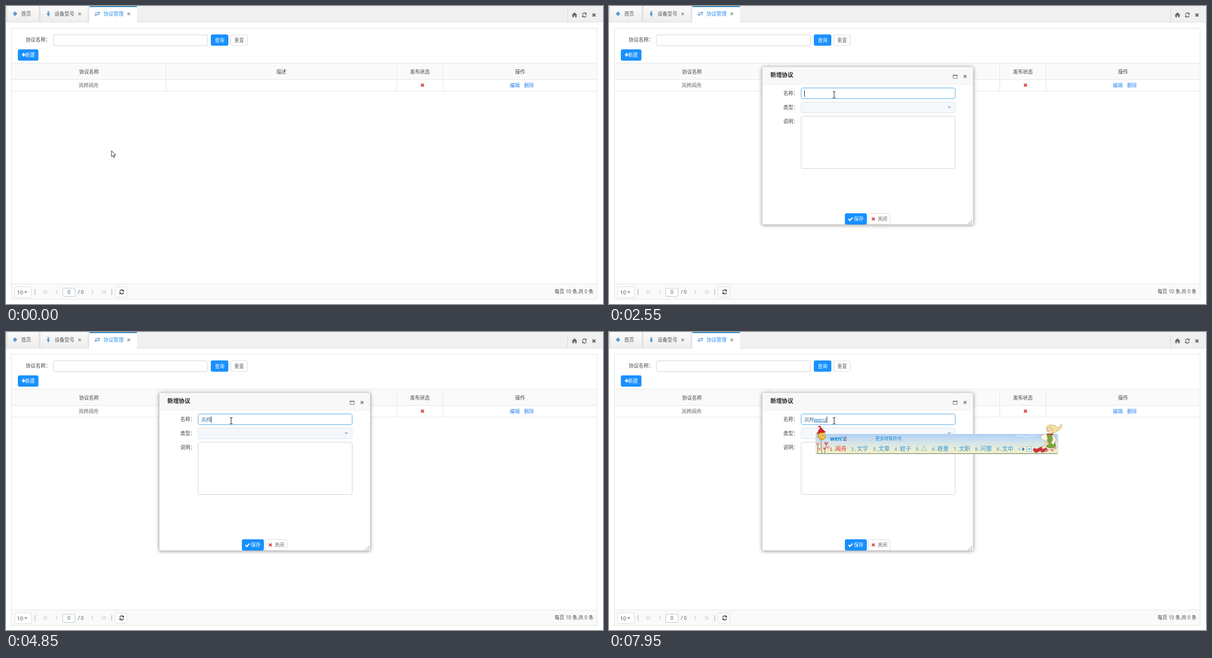
An HTML page that plays this animation: 1058x529 px, repeating every 8000 ms.

```html
<!DOCTYPE html>
<html lang="zh-CN">
<head>
<meta charset="utf-8">
<style>
html, body { margin: 0; height: 100%; overflow: hidden; background: #fff; }
svg { display: block; width: 100vw; height: 100vh; font-family: "Open Sans", "Noto Sans CJK SC", "Noto Sans CJK", sans-serif; }
#dialog { filter: drop-shadow(0 1px 3px rgba(0,0,0,.4)); }
</style>
</head>
<body>
<svg id="stage" viewBox="0 0 1058 529">
  <defs>
    <linearGradient id="tab" x2="0" y2="1"><stop stop-color="#fafafa"/><stop offset="1" stop-color="#eee"/></linearGradient>
    <linearGradient id="sky" x2="0" y2="1"><stop stop-color="#afd0f6"/><stop offset=".45" stop-color="#d3e4ea"/><stop offset="1" stop-color="#f8f3c6"/></linearGradient>
  </defs>
  <g id="page"></g><g id="dialog"></g><g id="form"></g><g id="ime"></g><g id="status"></g><g id="cursor"></g>
</svg>
<script>
const $ = id => document.getElementById(id);
const [page, dialog, form, ime, status, cursor] = ['page', 'dialog', 'form', 'ime', 'status', 'cursor'].map($);
const BLUE = '#1890ff', RED = '#d2453f', LINE = '#e6e6e6';

function el(parent, tag, attrs, content) {
  const node = document.createElementNS('http://www.w3.org/2000/svg', tag);
  for (const k in attrs) node.setAttribute(k, attrs[k]);
  if (content) node.textContent = content;
  return parent.appendChild(node);
}
const group = (p, x = 0, y = 0) => el(p, 'g', { transform: `translate(${x} ${y})` });
const rect = (p, x, y, width, height, fill, stroke = 'none', rx = 0) =>
  el(p, 'rect', { x, y, width, height, fill, stroke, rx });
const path = (p, d, fill, stroke = 'none', w = 1) =>
  el(p, 'path', { d, fill, stroke, 'stroke-width': w });
const line = (p, d, stroke = LINE, w = 1) => path(p, d, 'none', stroke, w);
const dot = (p, cx, cy, rx, ry, fill) => el(p, 'ellipse', { cx, cy, rx, ry, fill });
const text = (p, x, y, str, fill = '#444', size = 8.8, more = {}) =>
  el(p, 'text', { x, y, fill, 'font-size': size, ...more }, str);
const centered = { 'text-anchor': 'middle' }, bold = { 'font-weight': 700 }, medium = { 'font-weight': 500 };

const cross = (p, x, y, r, color, w) =>
  line(p, `M${x - r} ${y - r}l${2 * r} ${2 * r}m0 ${-2 * r}l${-2 * r} ${2 * r}`, color, w);
const arrowDown = (p, x, y, color) => path(p, `M${x - 3} ${y}h6l-3 3z`, color);
function refresh(p, x, y, color) {
  const g = group(p, x, y);
  line(g, 'M-3.5 -.8A3.6 3.6 0 0 1 2.6 -2.6M3.5 .8A3.6 3.6 0 0 1 -2.6 2.6', color, 1.4);
  path(g, 'M4 -4.4v3.6h-3.6zM-4 4.4v-3.6h3.6z', color);
}
function button(p, x, y, w, label, primary, labelX = 7) {
  const box = primary ? rect(p, x, y, w, 20, BLUE, 'none', 3)
                      : rect(p, x + .5, y + .5, w - 1, 19, '#fff', '#ddd', 3);
  text(p, x + labelX, y + 13, label, primary ? '#fff' : '#666', 8.6, primary ? medium : {});
  return box;
}

// Tab bar
rect(page, 0, 0, 1058, 28, '#f0f0f0');
line(page, 'M0 28.5H1058', '#ddd');
rect(page, 2, 0, 56, 28, 'url(#tab)');
rect(page, 61, 0, 85, 28, 'url(#tab)');
line(page, 'M1.5 0V28M58.5 0V28M60.5 0V28M145.5 0V28M995.5 5V28', '#d9d9d9');
rect(page, 148, 0, 84, 29, '#fff');
rect(page, 148, 0, 84, 2, '#3c8dbc');
path(page, 'M16 9.5l4 4.3-4 4.3-4-4.3z', '#5a9bd0');
path(page, 'M75 12l3 2-3 4-3-4z', '#5a9bd0');
dot(page, 75, 10.5, 1.6, 1.6, '#5a9bd0');
line(page, 'M75 11V18.5', '#5a9bd0', 1.6);
line(page, 'M158 12h7M159 15.5h7', '#4a90d0', 1.2);
path(page, 'M164 9.7l3 2.3-3 2.3zM160 13.2l-3 2.3 3 2.3z', '#4a90d0');
text(page, 27, 17, '首页', '#555');
text(page, 86, 17, '设备型号', '#555');
text(page, 173, 17, '协议管理', '#2a8df0');
cross(page, 130.5, 14, 2.1, '#999', 1.5);
cross(page, 217.5, 14, 2.1, '#999', 1.5);
path(page, 'M1002.5 16l5-4.7 5 4.7h-1.2v4h-2.7v-3h-2.2v3h-2.7v-4z', '#666');
refresh(page, 1025, 16, '#666');
cross(page, 1042, 16, 2.6, '#666', 2.1);

// Search area
rect(page, 9.5, 39.5, 1038, 481, '#fff', LINE);
text(page, 35, 63, '协议名称：');
rect(page, 84, 51, 273, 19.5, '#fff', '#d5d5d5', 3);
button(page, 363, 50.5, 31, '查询', true);
button(page, 398, 50.5, 30, '重置', false, 6.5);
const newButton = button(page, 21, 77, 36.5, '新建', true, 13);
line(page, 'M28 86.5h6.4M31.2 83.3v6.4', '#fff', 2);

// Table
rect(page, 10, 102, 1037, 28, '#fafafa');
const cell = rect(page, 10, 131, 273, 20, '#f5f5f5');
line(page, 'M10 101.5H1047M10 130.5H1047M10 151H1047M283.5 102V151M692.5 102V151M774.5 102V151');
[[147, '协议名称'], [488, '描述'], [733.5, '发布状态'], [911, '操作']]
  .forEach(([x, s]) => text(page, x, 119.5, s, '#444', 8.8, centered));
text(page, 146.5, 143.5, '岚桦闻舟', '#666', 8.8, centered);
cross(page, 738, 140.5, 2.5, RED, 2.1);
text(page, 893, 143.5, '编辑', '#2a86f5');
text(page, 918, 143.5, '删除', '#2a86f5');

// Pager
rect(page, 10, 493, 1037, 27, '#fafafa');
line(page, 'M10 493.5H1047');
rect(page, 15.5, 498.5, 30, 19, '#fff', '#ddd', 3);
text(page, 19.5, 511.5, '10', '#444', 9.5);
arrowDown(page, 35, 506.5, '#6a8fb0');
line(page, 'M51.5 502.5V513M187.5 502.5V513', '#aaa');
line(page, 'M69 504.5l-3 3 3 3M73 504.5l-3 3 3 3M91.5 504.5l-3 3 3 3M151.5 504.5l3 3-3 3M170 504.5l3 3-3 3M174 504.5l3 3-3 3', '#ccc', 1.1);
rect(page, 100.5, 501, 22, 14.5, '#fff', '#b5cde0', 2);
text(page, 111.5, 511, '0', '#444', 8.5, centered);
text(page, 127.5, 511, '/ 0', '#444', 8.5);
rect(page, 193.5, 498.5, 20.5, 18.5, '#fff', '#ddd', 3);
refresh(page, 205, 507.5, '#444');
text(page, 1041, 509.5, '每页 10 条,共 0 条', '#444', 8.6, { 'text-anchor': 'end' });

// Dialog frame
rect(dialog, 271.5, 108, 374, 280, '#fff', '#d0d0d0', 2);
rect(dialog, 272, 108.5, 373, 30, '#f8f8f8');
line(dialog, 'M272 138.5H645', '#eee');
text(dialog, 286, 126, '新增协议', '#222', 10.2, bold);
rect(dialog, 610, 122.5, 7, 6, 'none', '#888');
line(dialog, 'M609.5 123.2h8', '#888', 2);
cross(dialog, 631, 125, 2.4, '#888', 1.8);
for (let i = 0; i < 3; i++)
  for (let j = 0; j <= i; j++) rect(dialog, 642 - 2.6 * j, 380 + 2.6 * i, 1.2, 1.2, '#777');

// Dialog form
['名称：', '类型：', '说明：'].forEach((s, i) => text(form, 309, 157.5 + 25 * i, s));
const nameBox = rect(form, 340.5, 145.5, 273, 19, '#fff', '#d5d5d5', 3);
rect(form, 340.5, 170.5, 273, 19, '#f4f8fc', '#dde3ea', 3);
arrowDown(form, 603, 178.5, '#7fa6c8');
rect(form, 340.5, 195.5, 273, 93, '#fff', '#d5d5d5', 3);
button(form, 418, 368, 39, '保存', true, 16);
line(form, 'M424.5 378l2.4 2.6 4.6-5', '#fff', 2.1);
button(form, 459, 368, 39.5, '关闭', false, 17);
cross(form, 468.5, 378, 2.4, RED, 2);
const committed = text(form, 346, 158.5, '', '#4a7ba6');
const composing = text(form, 346, 158.5, '', '#2b76b5', 9.4, { 'text-decoration': 'underline' });
const caret = rect(form, 0, 150, 1, 11, '#333');

// Status bubble
path(status, 'M-1 517.5H254.5Q257.5 517.5 257.5 520.5V530H-1z', '#fff', '#d0d0d0');

// Pointers
const pointers = {
  arrow: group(cursor), hand: group(cursor), beam: group(cursor)
};
path(pointers.arrow, 'M0 0V10.5L2.4 8.3 4 12 5.8 11.2 4.2 7.6H7.4z', '#fff', '#222', .9);
path(pointers.hand, 'M-1 1Q0 -.5 1 1V5L6 6.2Q7 6.5 6.8 8L6 12H0L-3.4 7.4Q-3 6-1 7.6z', '#fff', '#222', .9);
line(pointers.beam, 'M-2.5 -5.5H-.8L0 -5 .8 -5.5H2.5M0 -5V5M-2.5 5.5H-.8L0 5 .8 5.5H2.5', '#222');

// Input method panel
const heart = (p, x, y, s, color) =>
  path(p, `M${x} ${y + s}C${x - 2 * s} ${y - s / 2} ${x - s / 2} ${y - 1.6 * s} ${x} ${y - s / 3}C${x + s / 2} ${y - 1.6 * s} ${x + 2 * s} ${y - s / 2} ${x} ${y + s}`, color);

function birdhouse(p, x) {
  const g = group(p, x, 0);
  line(g, 'M9.5 188L11 215M4 199V215M19 199L16 215', '#a08a60', 1.2);
  path(g, 'M5 179L15 178 18 187 14 191H8L4 186z', '#f2b632', '#a0722a', .7);
  dot(g, 13, 184, 2.6, 2.6, '#fff1b0');
  dot(g, 13, 184, 1.2, 1.2, '#6b4520');
  path(g, 'M2 181L9 169 18 178Q10 177 2 181z', '#d8232a', '#8f1c1c', .6);
  path(g, 'M9 170V166L3 168 9 170', '#d8232a');
  [[4, 199, 3.2], [19, 198, 3.2], [7, 208, 2.6], [16, 207, 2.4], [22, 205, 2.8]]
    .forEach(([hx, hy, s], i) => heart(g, hx, hy, s, i % 2 ? '#dd5f66' : '#e9a0a0'));
}

function girl(p, x) {
  const g = group(p, x, 0);
  path(g, 'M-20 201L-5 203Q-14 213 -34 210L-33 205z', '#f4ead0', '#b5966a', .7);
  path(g, 'M-44 208Q-41 205-38 208L-29 204-27 209-38 214Q-43 214-44 208z', '#d9303a', '#8d2730', .6);
  path(g, 'M-29 209L-21 205-17 210-27 214-31 213z', '#c93a40');
  path(g, 'M-20 181L-10 180Q-6 191-4 203-12 208-20 204-16 193-20 181z', '#79a83b', '#4f7426', .7);
  path(g, 'M-20 181Q-30 181-31 188L-23 194-18 190z', '#fbf6ea', '#b09a78', .7);
  path(g, 'M-11 180L-3 191-8 200-12 197-9 191z', '#fbf6ea', '#b09a78', .7);
  path(g, 'M-23 193L-16 197-18 201-26 197z', '#f7d0ae');
  dot(g, -15, 174, 6, 5.6, '#fbdcc0');
  dot(g, -17, 176.5, 1.7, 1.1, '#f0a093');
  line(g, 'M-19 174h2M-14 174h2', '#6a4a30', .8);
  path(g, 'M-21 173Q-20 163-10 165-4 166-1 170 5 168 6 163 9 171 0 175-5 180-10 179-7 171-14 169-18 169-21 173z', '#f3e2a0', '#b99a4e', .7);
  path(g, 'M-20 180Q-14 184-8 179L-9 183H-19z', '#d8353a');
  [[-20, 211, 2.4], [-10, 210, 2.6], [-5, 206, 2.2]].forEach(([hx, hy, s]) => heart(g, hx, hy, s, '#e58a8a'));
}

function drawPanel(left, spelling, words, tip) {
  ime.replaceChildren();
  const list = words.split(' '), gap = 8.2, ends = [];
  const width = 104 + gap * (list.length - 1) + list.reduce((sum, w) => sum + 10 + 10 * w.length, 0);
  const right = left + width;
  rect(ime, left + .5, 182, width - .5, 34.5, '#8d9a8a', 'none', 3);
  rect(ime, left, 181, width, 34, 'url(#sky)', 'none', 3);
  line(ime, `M${right - 73} 184h10l3 2h8l3 -2h9`, '#eef6ff');
  birdhouse(ime, left);
  girl(ime, right);
  const label = text(ime, left + 25.5, 193, spelling, '#0a7fd0', 9.8, bold);
  const end = left + 26 + label.getComputedTextLength();
  line(ime, `M${end} 184V194`, '#d33');
  if (tip) {
    rect(ime, end + 41.5, 187, 5, 5, '#dde6ee', '#b9c6d2', 1);
    text(ime, end + 52, 192.3, tip, '#1f8ad6', 7.8);
  }
  let x = left + 25;
  list.forEach((word, i) => {
    const color = i ? '#2c93d8' : '#e5262c';
    text(ime, x, 211, `${i + 1}.`, color, 8.6, { 'font-family': '"Liberation Mono", monospace' });
    text(ime, x + 10, 211, word, color, 10);
    x += 10 + 10 * word.length + gap;
  });
  path(ime, `M${right - 67} 205v6l-4-3z`, '#a9cbe4');
  path(ime, `M${right - 63} 204.5v7l4-3.5z`, '#1477c0');
  rect(ime, right - 55.5, 203.5, 8.5, 8.5, '#f4fbf0', '#86bcdc');
  arrowDown(ime, right - 51.2, 206.7, '#5aa5d0');
}

// [time, committed text, spelling, candidates, tip]
const lettersW = '我 为 无 问 玩 外 万 王 网', lettersWe = '为 位 问 未 文 喂 温 味 围';
const wenz = '闻舟 文字 文章 蚊子 △ 稳重 文职 问罪 文中';
const keys = [
  [2550, '', ''],
  [3600, '', 'l', '了 来 老 两个 来了 里面 老师 路上 零'],
  [3800, '', 'la', '拉 啦 辣 腊 蜡 喇 垃 落 剌'],
  [3950, '', 'lan', '蓝 兰 烂 拦 栏 懒 篮 览 揽'],
  [4150, '', "lan'h", '兰花 懒汉 拦河 蓝灰 烂货 揽活 蓝花 篮后 懒猴'],
  [4200, '', "lan'hu", '兰花 蓝灰 篮护 懒户 烂糊 拦护 蓝花 蓝狐 蓝'],
  [4350, '', "lan'hua", '岚桦 兰花 蓝花 烂花 蓝画 揽花 懒话'],
  [4700, '岚桦', ''],
  [5050, '岚桦', 'w', lettersW],
  [5100, '岚桦', 'we', lettersWe],
  [5500, '岚桦', 'we', lettersWe, '工具箱(分号)'],
  [6000, '岚桦', 'w', lettersW],
  [6050, '岚桦', ''],
  [6800, '岚桦', 'w', lettersW],
  [6900, '岚桦', 'we', lettersWe],
  [7300, '岚桦', 'wen', '问 文 闻 温 稳 文字 问题 文章 温度 文件'.replace(' 温 ', ' ')],
  [7550, '岚桦', "wen'z", wenz],
  [7950, '岚桦', "wen'z", wenz, '更多特殊符号']
];

let shown = null;
function showKey(key) {
  if (key === shown) return;
  shown = key;
  const [, done, spelling, words, tip] = key || [0, '', ''];
  committed.textContent = done;
  const start = 346 + Math.floor(committed.getComputedTextLength());
  composing.textContent = spelling.replace("'", '');
  composing.setAttribute('x', start);
  caret.setAttribute('x', start + composing.getComputedTextLength());
  if (words) drawPanel(start + 3, spelling, words, tip);
}

// Pointer stops: [time, x, y]
const stops = [[150, 187, 257], [950, 49, 85.5], [1700, 49, 85.5], [2130, 598, 142], [2400, 399, 157.5]];
function pointerAt(t) {
  const i = stops.findIndex(s => s[0] > t);
  if (i === 0) return stops[0].slice(1);
  if (i < 0) return stops[stops.length - 1].slice(1);
  const [t0, x0, y0] = stops[i - 1], [t1, x1, y1] = stops[i];
  let k = (t - t0) / (t1 - t0);
  k = k * k * (3 - 2 * k);
  return [x0 + (x1 - x0) * k, y0 + (y1 - y0) * k];
}

const show = (node, on) => node.setAttribute('visibility', on ? 'visible' : 'hidden');
const inside = (x, y, l, t, r, b) => x >= l && x <= r && y >= t && y <= b;

function frame() {
  const t = performance.now() % 8000;
  const [x, y] = pointerAt(t);
  const onButton = inside(x, y, 21, 77, 57, 97);
  const onName = t > 1500 && inside(x, y, 340, 145, 614, 165);
  const kind = onName ? 'beam' : onButton && t < 1450 ? 'hand' : 'arrow';
  cursor.setAttribute('transform', `translate(${x} ${y})`);
  for (const name in pointers) show(pointers[name], name === kind);
  newButton.setAttribute('fill', onButton ? '#40a9ff' : BLUE);
  show(cell, t < 1450 && inside(x, y, 10, 131, 283, 151));
  show(dialog, t >= 1450);
  show(form, t >= 1500);
  show(status, t >= 1450 && t < 1800);

  const key = keys.filter(k => k[0] <= t).pop();
  showKey(key);
  nameBox.setAttribute('stroke', key ? '#5fb0e8' : '#d5d5d5');
  const lastPress = keys.filter(k => k[0] <= t && !k[4]).pop();
  show(caret, lastPress && (t - lastPress[0]) % 1040 < 520);
  // The panel fades out once the spelling is gone.
  const fade = !key || key[0] === 2550 ? 0 : key[2] ? 1 : Math.max(0, 1 - (t - key[0] + 50) / 200);
  ime.setAttribute('opacity', fade);
  requestAnimationFrame(frame);
}
frame();
</script>
</body>
</html>
```
